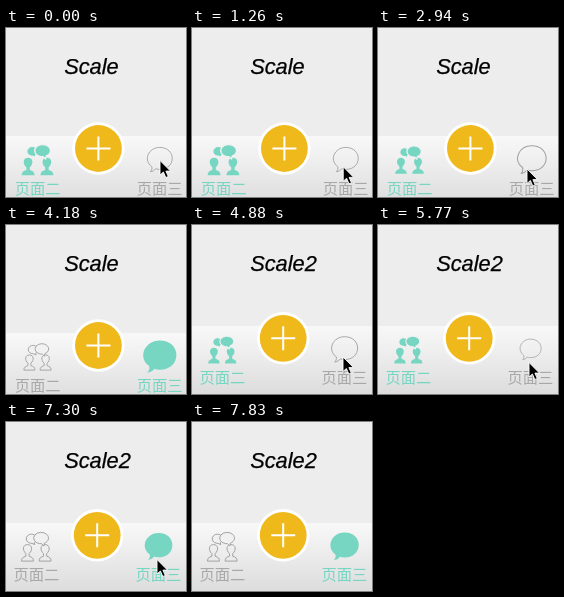
These frames come from a looping animation (180 px wide and 169 px high, 8 s). An HTML page:

```html
<!DOCTYPE html>
<html lang="zh">
<head>
<meta charset="utf-8">
<title>Tab bar scale</title>
<style>
html, body { margin: 0; width: 100%; height: 100%; overflow: hidden; background: #ededed; }
svg { display: block; width: 100vw; height: 100vh; }
#title { font: italic 21.8px "Liberation Sans", Arial, sans-serif; stroke: #000; stroke-width: .25; }
.label { font: 15.3px "Noto Sans CJK SC", "Noto Sans CJK", sans-serif; text-anchor: middle; fill: #a8a8a8; }
.icon { fill: none; stroke: #a2a2a2; stroke-width: 1; stroke-linejoin: round; }
.on .label { fill: #76d6c2; }
.on .icon { fill: #76d6c2; stroke: none; }
.icon .front { fill: #f1f1f1; }
.on .icon .front { fill: #76d6c2; stroke: #f1f1f1; stroke-width: 1.2; }
</style>
</head>
<body>
<svg viewBox="0 0 180 169" preserveAspectRatio="none">
  <defs>
    <linearGradient id="shade" x1="0" y1="0" x2="0" y2="1">
      <stop offset="0" stop-color="#f8f8f8"/>
      <stop offset=".35" stop-color="#efefef"/>
      <stop offset="1" stop-color="#dcdcdc"/>
    </linearGradient>
    <g id="person">
      <path d="M-6 14.5C-6 11.500-4.500 10.600-1.600 9.600V7C-5.400 3.600-4.800-2 0-2S5.400 3.600 1.600 7V9.600C4.500 10.600 6 11.500 6 14.500Z"/>
    </g>
  </defs>
  <rect width="180" height="169" fill="#ededed"/>
  <text id="title" x="58.2" y="46"></text>
  <rect id="bar" width="180" height="69" fill="url(#shade)"/>
  <g id="content">
    <g id="left">
      <g class="icon">
        <use href="#person" x="-8.800"/>
        <use href="#person" x="8.800"/>
        <path class="front" d="M-8-4.200A5.200 4.600 0 1 1-2-4L-1.500-2-4.300-3.200Q-6-3.200-8-4.200Z"/>
        <path class="front" d="M3-3A7.400 5.700 0 1 1 8-3.400L7.600-.6 5.200-2.900Z"/>
      </g>
      <text class="label" x="31.6" y="165.7">页面二</text>
    </g>
    <g id="right">
      <path class="icon" d="M-4.500 10.200C-6 12.400-8 13.200-10.300 13.600C-8.700 11.600-8.200 9.800-8.800 8C-19 .2-12-13.400 0-13.400C18.600-13.400 18.600 11 0 11Q-2.500 11-4.500 10.200Z"/>
      <text class="label" x="153.6" y="165.7">页面三</text>
    </g>
    <g transform="translate(92.4 120.500)">
      <circle r="26.200" fill="#fff"/>
      <circle r="23.400" fill="#efb91c"/>
      <path d="M-12 0H12M0-12V12" stroke="#fff" stroke-width="2"/>
    </g>
  </g>
  <path id="cursor" d="M0 0V14.500L3.400 11.500 5.800 17 8.300 16 5.900 10.600H10.500Z" stroke="#fff" stroke-width=".9"/>
</svg>
<script>
const LOOP = 8000, TICKS = 90;
// Moments of the story, in ticks
const PRESS = 19, SELECT = 34, SWITCH = 50, PRESS_AGAIN = 65, RELEASE = 77;
const el = id => document.getElementById(id);

// Ease-out from 0 to 1; the first step already shows at the start tick
function ease(tick, start, steps) {
  const p = Math.min(1, Math.max(0, (tick - start + 1) / steps));
  return 1 - (1 - p) ** 2;
}

// Underdamped bounce after release
function spring(ticks) {
  const s = ticks * .089;
  return 1.03 - .27 * Math.exp(-2.9 * s) * Math.cos(11.5 * s);
}

function leftScale(k) {
  if (k >= SWITCH) return k < RELEASE ? .95 : 1;
  return 1.07 - .1 * ease(k, PRESS, 2) - .05 * ease(k, SELECT, 3);
}

function rightScale(k) {
  if (k >= RELEASE) return spring(k - RELEASE);
  if (k >= SWITCH) return k < PRESS_AGAIN ? .94 : .76;
  return .9 + .13 * ease(k, PRESS, 2) + .17 * ease(k, SELECT, 3);
}

function pointer(k) {
  if (k >= SWITCH) {
    return [147 + 4 * ease(k, 52, 3), 134 - 2 * ease(k, 52, 3) + 5.5 * ease(k, 60, 2)];
  }
  const down = ease(k, 14, 3), leave = ease(k, 45, 3);
  return [154 - 5 * down - leave, 132.5 + 3.5 * ease(k, 5, 2) + 5 * down + 28 * leave];
}

function move(node, [x, y], scale = 1) {
  node.setAttribute('transform', `translate(${x} ${y}) scale(${scale})`);
}

function draw(ms) {
  const k = Math.floor((ms + 10) * TICKS / LOOP);
  const second = k >= SWITCH;
  const rightOn = k >= RELEASE || (k >= SELECT && !second);
  el('title').textContent = second ? 'Scale2' : 'Scale';
  el('bar').setAttribute('y', second ? 101 : 108);
  move(el('content'), second ? [-1.2, -7.2] : [0, 0]);
  el('left').classList.toggle('on', !rightOn);
  el('right').classList.toggle('on', rightOn);
  move(el('left').querySelector('.icon'), [31.5, 131.8], leftScale(k));
  move(el('right').querySelector('.icon'), [153.7, 131.5], rightScale(k));
  const shown = k < 47 || (k >= 52 && k < 83);
  el('cursor').style.display = shown ? '' : 'none';
  move(el('cursor'), pointer(k));
}

function frame(now) {
  draw(now % LOOP);
  requestAnimationFrame(frame);
}
draw(0);
requestAnimationFrame(frame);
</script>
</body>
</html>
```
